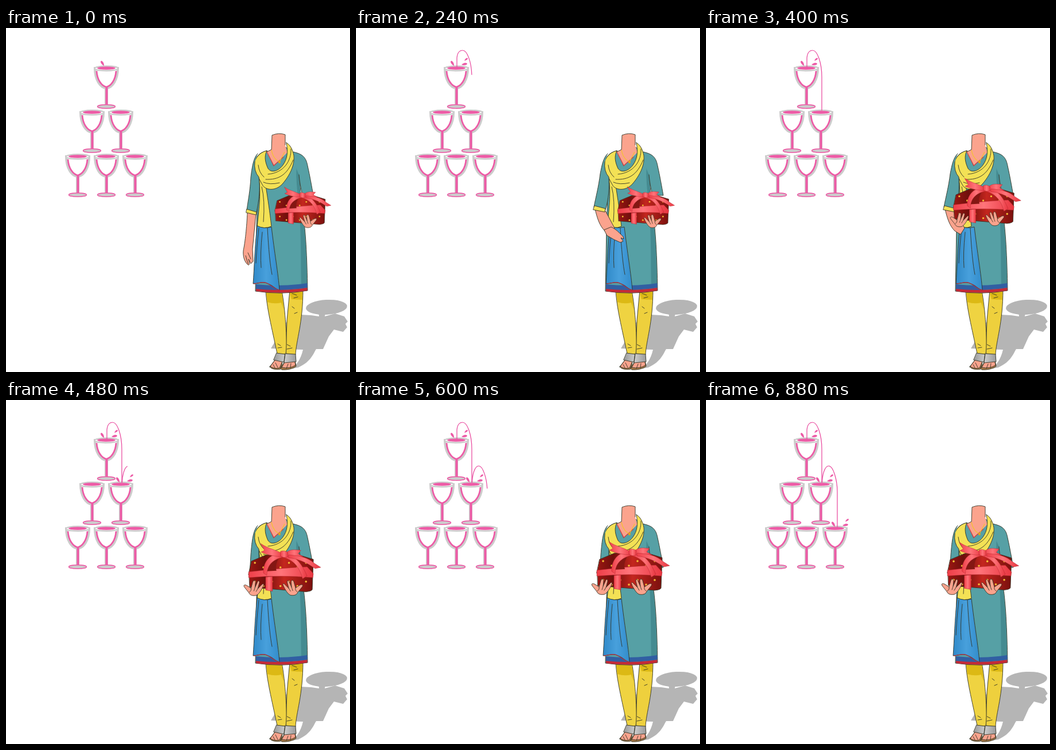
Recreate the animation shown at these times as an HTML page. Size 600 by 600 pixels, loop 1 s.

```html
<!DOCTYPE html>
<html>
<head>
<meta charset="utf-8">
<title>Gift and glasses</title>
<style>
html, body { margin: 0; width: 100%; height: 100%; overflow: hidden; background: #fff; }
svg { display: block; width: 100vw; height: 100vh; }
.line { stroke: #343526; stroke-width: .9; stroke-linejoin: round; stroke-linecap: round; }
.none { fill: none; }
.skin { fill: #fba38d; }
.teal { fill: #56a0a5; }
.yellow { fill: #f3e155; }
.pink { fill: #ed5ba6; }
.jet { fill: none; stroke: #e8439b; stroke-width: 1.2; }
.ribbon { fill: url(#ribbon); stroke: #b3232d; stroke-width: .5; }
</style>
</head>
<body>
<svg viewBox="0 0 600 600">
  <defs>
    <linearGradient id="blue"><stop offset="0" stop-color="#3089c8"/><stop offset=".5" stop-color="#48a0dc"/><stop offset="1" stop-color="#328ccb"/></linearGradient>
    <linearGradient id="silver"><stop offset="0" stop-color="#999"/><stop offset=".5" stop-color="#ccc"/><stop offset="1" stop-color="#999"/></linearGradient>
    <linearGradient id="red"><stop offset="0" stop-color="#9c1612"/><stop offset=".25" stop-color="#6e0f0c"/><stop offset=".55" stop-color="#c4261e"/><stop offset="1" stop-color="#7a100d"/></linearGradient>
    <linearGradient id="ribbon"><stop offset="0" stop-color="#ee3f49"/><stop offset=".5" stop-color="#ff747a"/><stop offset="1" stop-color="#e83640"/></linearGradient>
    <g id="glass">
      <path d="M-20 4C-20 24-11 38 0 39C11 38 20 24 20 4Z" fill="#fff" stroke="#ccc" stroke-width="4"/>
      <path class="none" d="M-17 9C-16 25-8 35 0 37C8 35 16 25 17 9" stroke="#ed5ba6" stroke-width="2.8"/>
      <path d="M-3 38H3V70H-3Z" fill="#ccc"/>
      <path class="pink" d="M-1.500 37H2.500V70H-1.500Z"/>
      <ellipse cy="71" rx="15.500" ry="3.200" fill="#ccc" stroke="#ed5ba6" stroke-width="1.4"/>
      <ellipse cy="4.500" rx="20.500" ry="4" fill="#fff" stroke="#ccc" stroke-width="2.4"/>
      <ellipse class="pink" cy="4" rx="16" ry="2.800"/>
    </g>
    <path id="drop" class="pink" d="M0 0C2-3 5-5 8-4C10-2 5 1 0 0Z"/>
    <g id="hand" class="skin line">
      <path d="M-16-4C-18-8-15-9-13-6L-6 1L-9-10C-9-14-6-14-5-10L-1-1L-2-11C-1-15 2-14 3-11L6 0L14-5C18-7 20-5 18-2L10 8C8 13 3 14-3 13C-8 11-12 4-16-4Z"/>
      <path class="none" d="M-6 1L-3 6M-1-1L1 5M6 0Q5 5 9 7"/>
    </g>
  </defs>

  <g id="glasses"></g>
  <path class="jet" d="M176 68V52C177 42 181 39 186 39C194 39 202 60 202 86V144"/>
  <path class="jet" d="M202.500 144C203 130 207 115 214 115C222 115 229 140 229 160V222"/>
  <g id="drops"></g>

  <g fill="#b5b5b5">
    <ellipse cx="559" cy="487" rx="36" ry="13" transform="rotate(-3 559 487)"/>
    <path d="M545 493H558L556 503L574 498L590 503L596 512L592 516L595 522L588 530L572 526L563 538L553 560H541C536 568 532 582 510 592L500 594Q514 580 518 561L462 559L489 513L497 499L532 501L546 503Z"/>
  </g>

  <g id="legs" class="line">
    <path fill="#eed03d" d="M495 457L490 510L488 568L505 570C506 545 518 515 518 456Z"/>
    <path fill="#efd341" d="M453 458C455 490 463 520 473 568L488 569C491 545 487 490 481 458Z"/>
    <path fill="#dcb915" stroke="none" d="M454 460H481L484 490L480 479Q468 482 456 478ZM495 460H517V474L498 473Z"/>
    <path class="none" d="M499 463L507 466M502 471L509 469M499 486L503 489M503 498L508 496M474 551L479 554M474 558L481 557M490 552L496 555M490 560L499 558"/>
    <path fill="#a97845" d="M460 591L470 578L482 584L479 595Q465 597 460 591ZM479 592L488 580L504 579L506 590Q497 597 481 596Z"/>
    <path class="skin" d="M461 590L471 577L482 582L477 593Q466 595 461 590ZM481 592L488 579L503 578L505 588Q495 595 481 592Z"/>
    <path fill="url(#silver)" d="M472 567L487 569L485 583L467 579ZM487 568L505 569L506 582L485 584Z"/>
    <path class="none" d="M470 584L474 592M466 587L469 593M492 586L489 594M497 585L496 593"/>
  </g>

  <g id="dress">
    <path class="teal line" d="M455 214C443 217 436 223 434 235L439 290L437 345L435 459Q480 466 526 458C525 400 523 350 516 310L511 256L498 216L484 205L467 240Z"/>
    <path fill="#458b91" d="M508 235C504 255 508 280 512 325C515 370 514 410 515 447L525 446C524 390 521 350 516 310L511 256Z"/>
    <path fill="#315fa3" d="M436 447Q480 452 525.500 445V453Q480 460 436 456Z"/>
    <path fill="#c42a37" d="M436 455Q480 460 525.500 453V458Q480 465 436 459Z"/>
    <path class="teal line" d="M494 215C516 218 523 224 526 240C530 258 533 275 536 292L517 292Q512 270 511 256"/>
  </g>

  <g id="neck">
    <path class="skin" d="M464 187Q476 182 487 186L487 205L491 217L467 240L454 216L463 212Z"/>
    <path class="line none" d="M455 216L463 212L464 187Q476 182 487 186V204"/>
    <path class="none" d="M455 216L467 240L484 225" stroke="#d43b42" stroke-width="1.2"/>
    <path class="none" d="M463 213Q466 229 477 233L486 216" stroke="#f2c32d" stroke-width="1.2"/>
    <circle cx="477" cy="234" r="2" fill="#e6a514"/>
  </g>

  <g id="scarf">
    <path class="yellow line" d="M441 260C445 290 441 320 438 346Q450 351 463 346C460 320 457 300 453 275Z"/>
    <path class="yellow line" d="M489 200C496 204 500 212 502 222C504 240 494 258 483 271C472 284 455 284 448 275L441 262C434 254 431 242 434 232C438 222 446 216 455 214C450 224 452 234 457 245C463 254 476 249 483 239C491 228 492 216 489 200Z"/>
    <path class="line none" d="M497 211C498 232 484 253 457 255M501 230C490 257 475 265 453 264M449 269Q460 274 477 270M440 239Q441 252 450 260M446 277Q452 300 449 338"/>
  </g>
  <g id="cloth">
    <path class="line" fill="url(#blue)" d="M438 345C434 380 433 420 431 446C440 446 448 441 457 446C466 449 470 456 477 457C475 430 468 390 463 347Q450 351 438 345Z"/>
    <path class="none" d="M432 446C440 446 448 441 457 446S470 456 477 457" stroke="#a93543" stroke-width="1.4"/>
    <path class="line none" d="M447 356Q443 395 445 418M456 349Q459 405 464 430M441 349Q437 385 436 410"/>
  </g>

  <g id="armDown" class="line">
    <path class="skin" d="M421 322C420 347 417 374 414 388C413 399 416 408 422 413C425 415 425 409 423 403L427 411L431 407L430 386L436 324Z"/>
    <path class="none" d="M418 397L422 411M422 392L427 403"/>
    <path class="teal" d="M439 219C431 227 429 245 427 260C426 284 422 301 420 318L437 322C441 301 444 281 441 260Q432 250 434 233"/>
    <path class="yellow" d="M420 316L437 321L436 326L419 322Z"/>
  </g>
  <g id="armBent" class="line">
    <path class="skin" d="M417 316C421 333 425 345 434 354L444 360L451 349L435 319Z"/>
    <path id="rest" class="skin" d="M433 352L445 347C454 351 460 358 466 364L467 368L462 366L466 372L461 374L450 369L438 362Z"/>
    <path class="teal" d="M439 219C431 227 429 239 426 254C423 278 418 296 415 312L435 317C441 299 442 277 441 260Q432 250 434 233"/>
    <path class="yellow" d="M416 310L435 315L434 321L414 317Z"/>
  </g>
  <path id="armUp" class="teal line" d="M439 219C431 227 429 245 427 270L425 306L441 306L441 260Q432 250 434 233"/>

  <g id="box">
    <path class="line" fill="url(#red)" d="M-52-22L-26-33H31L57-25L56 2H-57Z"/>
    <path class="line" fill="url(#red)" d="M-56 0H56L55 28Q54 31 44 32L-55 24Z"/>
    <g id="dots" fill="#f5bd35"></g>
    <path class="ribbon" d="M-57-3Q0-10 46-12L57 0L56 7Q0 2-57 7Z"/>
    <path class="ribbon" d="M-27 6L-15 5V31L-27 29Z"/>
    <path d="M-27-4C-28-18-17-29-3-29C-9-18-10-12-8-5Z" fill="#841713"/>
    <path class="ribbon" d="M0-36C-20-35-32-20-31-1L-25 3C-25-14-15-25 4-29Z"/>
    <path class="ribbon" d="M9-36C28-29 37-16 46 4L38 9C33-9 25-22 6-28Z"/>
    <path class="ribbon" d="M2-35C-10-43-21-43-36-53L-29-41L-35-38C-22-32-10-30 4-30Z"/>
    <path class="ribbon" d="M8-36C16-44 25-42 35-41L30-35L39-30Q24-26 8-31Z"/>
    <path class="ribbon" d="M13-33C33-32 48-28 59-18L70-11L60-9L54-13C42-21 28-26 13-28Z"/>
    <path class="ribbon" d="M-1-39Q6-42 12-37L11-29Q4-27-1-31Z"/>
  </g>
  <use id="handR" href="#hand"/>
  <use id="handL" href="#hand"/>
</svg>
<script>
const $ = id => document.getElementById(id);
const fill = (id, n, part) => $(id).innerHTML = Array.from({ length: n }, (_, i) => part(i)).join('');

fill('glasses', 3, row => Array.from({ length: row + 1 }, (_, i) =>
  `<use href="#glass" x="${175 - 25 * row + 50 * i}" y="${66 + 77 * row}"/>`).join(''));

fill('dots', 14, i =>
  `<circle cx="${-46 + 15 * (i >> 1)}" cy="${i % 2 * 33 - 19 + (i >> 1) % 2 * 8}" r="1.8"/>`);

// One splash per level: a drop to the left, then two to the right
fill('drops', 3, i => `<g transform="translate(${176 + 27 * i} ${66 + 77.5 * i})">
  <use href="#drop" transform="translate(-5 0) rotate(215) scale(1.1 -1.1)"/>
  <g><use href="#drop" transform="translate(8 -2) rotate(12) scale(1.1)"/>
  <use href="#drop" transform="translate(13 -9) rotate(-15) scale(.8)"/></g></g>`);

const clamp = p => Math.min(1, Math.max(0, p));
const span = (t, from, length) => clamp((t - from) / length);
const smooth = p => p * p * (3 - 2 * p);

const show = (el, on) => el.style.display = on ? '' : 'none';
const place = (id, x, y, sx = 1, sy = sx) =>
  $(id).setAttribute('transform', `translate(${x} ${y}) scale(${sx} ${sy})`);

const jets = [...document.querySelectorAll('.jet')];
const splashes = [...$('drops').children];

function draw(now) {
  const t = Math.floor(now % 1000 / 40) * 40;

  jets.forEach((jet, i) => {
    const run = (t - 80 - 320 * i) * (i ? .385 : .515);
    show(jet, run > 0);
    jet.style.strokeDasharray = `${Math.max(0, run)} 999`;
  });
  splashes.forEach((splash, i) => {
    show(splash, t >= 420 * i);
    show(splash.lastElementChild, t >= 420 * i + 40);
  });

  const slide = 1 - (1 - span(t, 160, 440)) ** 2;
  const lift = smooth(span(t, 300, 240));
  const grow = smooth(span(t, 200, 320));
  const size = .84 + .16 * lift;
  place('box', 513 - 36 * slide, 318 - 18 * lift, .77 + .23 * grow - .02 * span(t, 640, 240));
  place('handR', 526 - 29 * slide, 337 - 11 * lift, size);
  place('handL', 430 + 21 * (1 - lift), 340 - 14 * lift, -size, size);

  const down = t < 240, up = t >= 440;
  show($('armDown'), down);
  show($('armBent'), !down && !up);
  show($('armUp'), up);
  show($('rest'), t < 320);
  show($('handL'), t >= 320);
  place('cloth', down || up ? 0 : 5, 0);
  requestAnimationFrame(draw);
}
requestAnimationFrame(draw);
</script>
</body>
</html>
```
